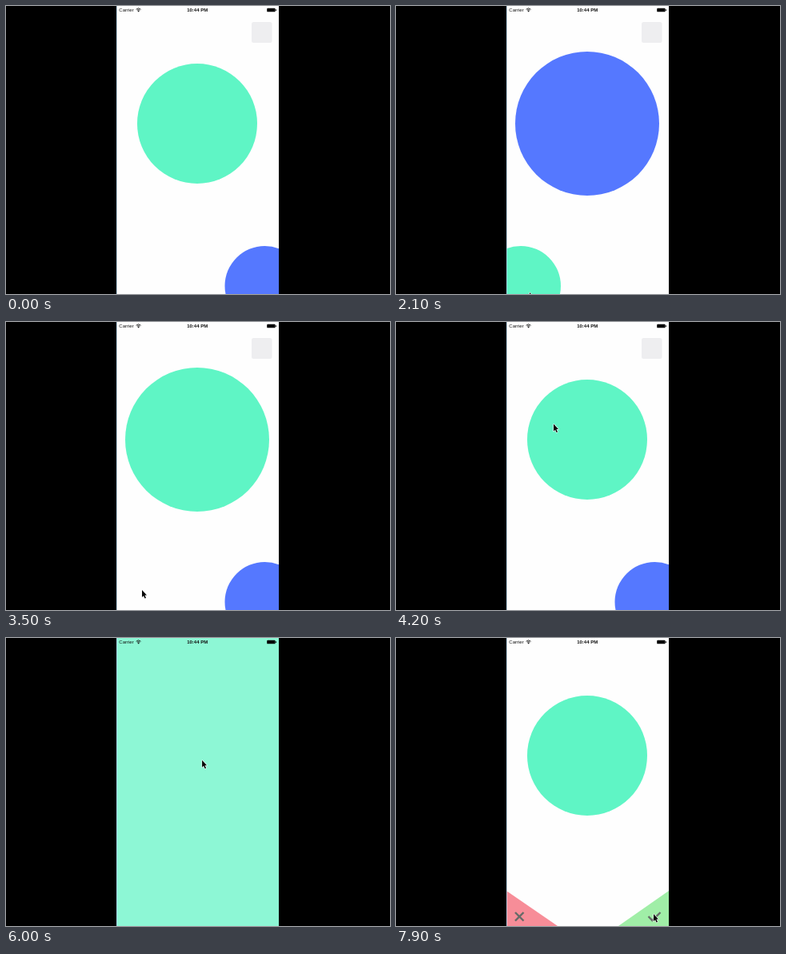
An HTML page with a canvas that plays this animation: 480x360 px, repeating every 8000 ms.

```html
<!DOCTYPE html>
<html lang="en">
<head>
<meta charset="utf-8">
<title>Circle switcher</title>
<style>
html, body { margin: 0; width: 100%; height: 100%; overflow: hidden; background: #000; }
canvas { display: block; width: 480px; height: 360px; }
</style>
</head>
<body>
<canvas id="stage" width="480" height="360"></canvas>
<script>
const ctx = document.getElementById('stage').getContext('2d');
const LOOP = 8000;
const GREEN = '#5ff5c5', BLUE = '#5578ff';
const LEFT = 138, RIGHT = 341;
const MAIN = { x: 239, y: 147, r: 75 };
const DOCK = { y: 350, r: 50 };
const SWAP = 900;

const clamp = v => Math.min(1, Math.max(0, v));
const mix = (a, b, k) => a + (b - a) * k;
const span = (t, a, b) => clamp((t - a) / (b - a));
const smooth = k => (1 - Math.cos(Math.PI * k)) / 2;
const ease = (t, a, b) => smooth(span(t, a, b));

// Curved way between a docked place (s = 0) and the centre (s = 1).
function place(dockX, s, size) {
  const q = 1 - s;
  const b1 = 3 * s * q * q, b2 = 3 * s * s * q, b3 = s * s * s;
  return {
    x: mix(dockX, MAIN.x, 0.1 * b2 + b3),
    y: mix(DOCK.y, MAIN.y, 0.55 * b1 + 0.9 * b2 + b3),
    r: mix(DOCK.r, MAIN.r, size)
  };
}

function rising(dockX, f) {
  return place(dockX, Math.pow(smooth(f), 1.22), 0.68 * f + 0.32 * Math.pow(f, 8));
}

function falling(dockX, f) {
  return place(dockX, 1 - Math.pow(smooth(f), 0.95), 1 - Math.pow(f, 1.2));
}

// Brief swelling of a circle that has just arrived.
const swell = (t, from, to) => 15 * (ease(t, from, from + 160) - ease(t, to - 170, to));

function circles(t) {
  const first = span(t, 980, 980 + SWAP);
  const second = span(t, 2320, 2320 + SWAP);
  let green, blue;
  if (t < 2320) {
    green = falling(156, first);
    blue = rising(323.5, first);
    blue.r += swell(t, 1880, 2320);
  } else {
    green = rising(156, second);
    blue = falling(323.5, second);
    green.r += swell(t, 3220, 3800);
  }
  return { green, blue };
}

function disc(c, color) {
  ctx.fillStyle = color;
  ctx.beginPath();
  ctx.arc(c.x, c.y, c.r, 0, Math.PI * 2);
  ctx.fill();
}

function poly(points, color) {
  ctx.fillStyle = color;
  ctx.beginPath();
  points.forEach(([x, y]) => ctx.lineTo(x, y));
  ctx.closePath();
  ctx.fill();
}

function stroke(points, color, width) {
  ctx.strokeStyle = color;
  ctx.lineWidth = width;
  ctx.beginPath();
  points.forEach(([x, y], i) => i ? ctx.lineTo(x, y) : ctx.moveTo(x, y));
  ctx.stroke();
}

function statusBar() {
  ctx.fillStyle = '#111';
  ctx.textBaseline = 'alphabetic';
  ctx.textAlign = 'left';
  ctx.font = '6px "Liberation Sans", Arial, sans-serif';
  ctx.fillText('Carrier', 141.3, 7.2);
  ctx.textAlign = 'center';
  ctx.font = 'bold 6px "Liberation Sans", Arial, sans-serif';
  ctx.fillText('10:44 PM', 239.2, 7.2);

  ctx.strokeStyle = '#111';
  ctx.lineWidth = 0.9;
  for (const r of [2.4, 4]) {
    ctx.beginPath();
    ctx.arc(165.6, 7, r, -Math.PI * 0.76, -Math.PI * 0.24);
    ctx.stroke();
  }
  disc({ x: 165.6, y: 6.4, r: 0.9 }, '#111');

  ctx.fillStyle = '#050505';
  ctx.beginPath();
  ctx.roundRect(326.2, 2.8, 10.4, 4.5, 0.9);
  ctx.fill();
  ctx.fillRect(337, 4.2, 0.9, 1.8);
}

function corners(k) {
  if (k <= 0) return;
  const gray = '#666b68';
  const off = 64 * (1 - k), drop = 44 * (1 - k);
  ctx.save();
  ctx.translate(-off, drop);
  poly([[LEFT, 316], [202, 360], [LEFT, 360]], '#f78d98');
  stroke([[149, 343], [159.5, 353.5]], gray, 2.4);
  stroke([[159.5, 343], [149, 353.5]], gray, 2.4);
  ctx.restore();

  ctx.save();
  ctx.translate(off, drop);
  poly([[RIGHT, 316], [RIGHT, 360], [278, 360]], '#a0eea7');
  stroke([[315.5, 348], [320.3, 353], [330.5, 343]], gray, 2.4);
  ctx.restore();
}

const TRACK = [
  [2000, 167, 363], [2100, 167, 358], [2700, 170, 335], [3650, 170, 335],
  [4150, 197, 127.5], [4600, 197, 127.5], [5400, 245, 152.5], [5950, 245, 152.5],
  [6500, 249, 160], [7750, 322, 345], [8000, 322, 345]
];

function cursor(t) {
  if (t < TRACK[0][0]) return;
  const i = Math.max(1, TRACK.findIndex(p => p[0] > t));
  const a = TRACK[i - 1], b = TRACK[i];
  const k = ease(t, a[0], b[0]);
  ctx.save();
  ctx.translate(mix(a[1], b[1], k), mix(a[2], b[2], k));
  const arrow = [[0, 0], [0, 9], [2, 7.2], [3.5, 10.6], [5, 10], [3.5, 6.6], [6, 6.5]];
  ctx.lineJoin = 'round';
  stroke([...arrow, arrow[0]], 'rgba(255,255,255,.85)', 1.3);
  poly(arrow, '#080808');
  ctx.restore();
}

function draw(t) {
  ctx.fillStyle = '#000';
  ctx.fillRect(0, 0, 480, 360);
  ctx.save();
  ctx.beginPath();
  ctx.rect(LEFT, 0, RIGHT - LEFT, 360);
  ctx.clip();
  ctx.fillStyle = '#fefefe';
  ctx.fillRect(LEFT, 0, RIGHT - LEFT, 360);

  const leave = ease(t, 4550, 5000);
  if (leave < 1) {
    ctx.globalAlpha = 1 - leave;
    ctx.fillStyle = '#eeeef0';
    ctx.beginPath();
    ctx.roundRect(307, 20, 25.5, 26, 2.5);
    ctx.fill();
    ctx.globalAlpha = 1;
  }

  const { green, blue } = circles(t);
  blue.y += 70 * leave;
  if (leave < 1) disc(blue, BLUE);

  const open = ease(t, 4550, 5350) - ease(t, 6050, 6750);
  green.r += 185 * open;
  ctx.globalAlpha = 1 - 0.3 * open;
  disc(green, GREEN);
  ctx.globalAlpha = 1;

  corners(ease(t, 6800, 7600));
  ctx.fillStyle = '#a9cfe6';
  ctx.fillRect(LEFT, 0, 0.8, 360);
  statusBar();
  cursor(t);
  ctx.restore();
}

const start = performance.now();
function tick(now) {
  draw(Math.max(0, now - start) % LOOP);
  requestAnimationFrame(tick);
}
draw(0);
requestAnimationFrame(tick);
</script>
</body>
</html>
```
